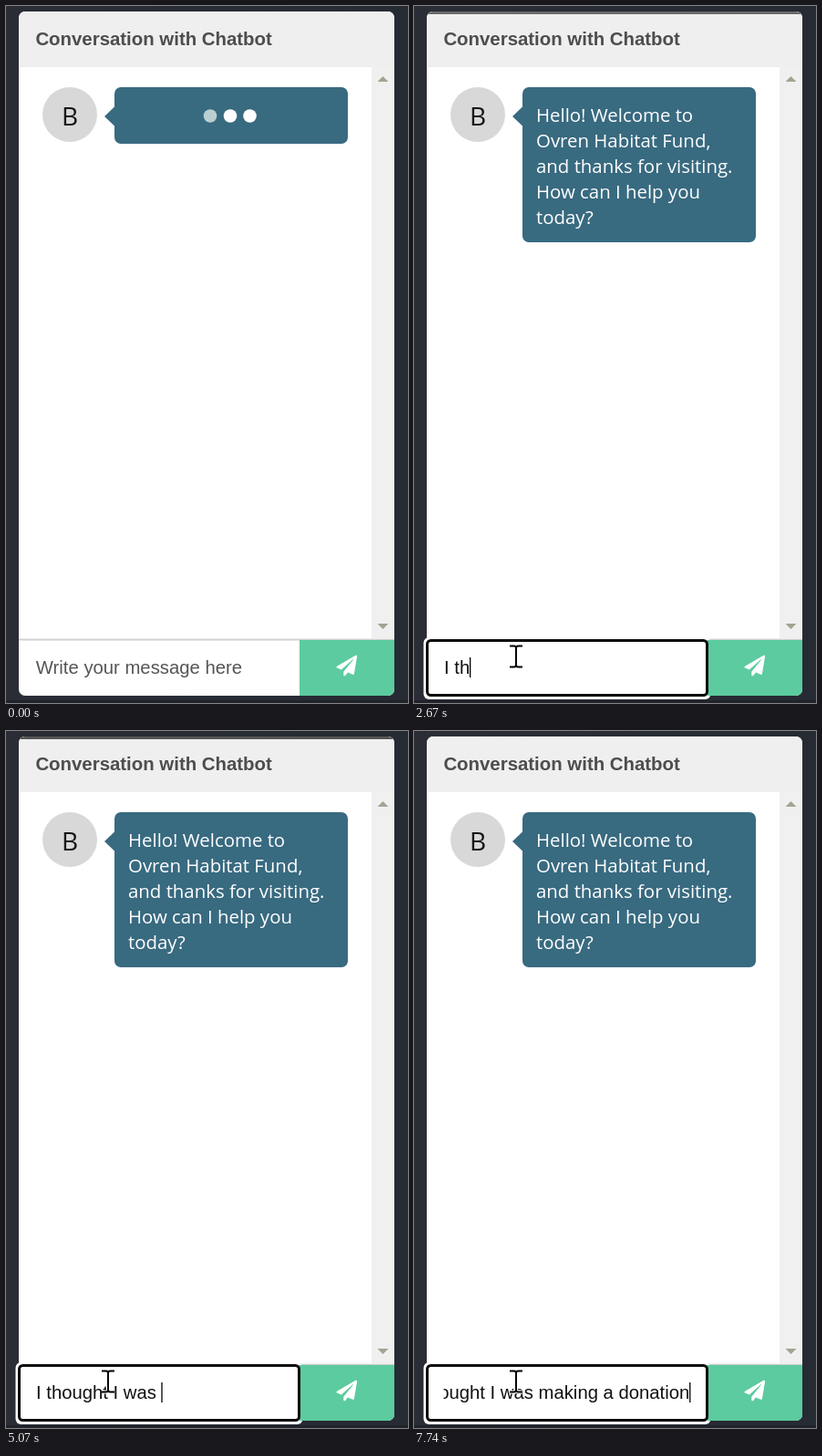
These frames come from a looping animation (441 px wide and 764 px high, 8000 ms). An HTML page:

```html
<!DOCTYPE html>
<html lang="en">
<head>
<meta charset="utf-8">
<title>Chatbot conversation</title>
<style>
html, body { margin: 0; width: 100%; height: 100%; overflow: hidden; background: #292c35; }
svg { display: block; width: 441px; height: 764px; }
text { white-space: pre; }
.ui { font: 20.3px "Liberation Sans", Arial, sans-serif; }
.head { font: bold 20.4px "Liberation Sans", Arial, sans-serif; fill: #4d4d4d; }
.talk { font: 20.4px "Open Sans", "Noto Sans", sans-serif; fill: #fff; }
.badge { font: 28px "Open Sans", "Noto Sans", sans-serif; fill: #151515; }
</style>
</head>
<body>
<svg viewBox="0 0 441 764" xmlns="http://www.w3.org/2000/svg">
  <defs>
    <linearGradient id="night">
      <stop offset="0" stop-color="#2b2d36"/>
      <stop offset="1" stop-color="#262b33"/>
    </linearGradient>
    <clipPath id="card"><rect x="14" y="6" width="412" height="750" rx="7"/></clipPath>
    <clipPath id="field"><rect x="32.5" y="700" width="271" height="50"/></clipPath>
  </defs>
  <rect width="441" height="764" fill="url(#night)"/>
  <rect y="761" width="441" height="3" fill="#202329"/>

  <g clip-path="url(#card)">
    <rect x="14" y="6" width="412" height="750" fill="#fff"/>
    <rect x="14" y="6" width="412" height="61" fill="#efefef"/>
    <rect id="bar" x="14" y="6" width="412" height="3"/>
    <rect x="401" y="67" width="25" height="627" fill="#f0f0f0"/>
    <path d="M407.5 83h12l-6-6zM407.5 677h12l-6 6z" fill="#a3a391"/>
    <rect x="14" y="693" width="412" height="1" fill="#ececec"/>
    <rect x="14" y="694" width="412" height="1.5" fill="#cfcfcf"/>
  </g>
  <text class="head" x="32.4" y="43">Conversation with Chatbot</text>

  <circle cx="70" cy="119" r="30" fill="#d8d8d8"/>
  <text class="badge" x="70" y="131" text-anchor="middle">B</text>
  <path d="M108 121l12-11.5v23z" fill="#386a80"/>
  <rect id="bubble" x="119" y="89" width="256" rx="7" fill="#386a80"/>
  <g id="dots" fill="#fff"></g>
  <g id="hello" class="talk"></g>

  <rect id="halo" x="10.5" y="692" width="315" height="68" rx="6" fill="#fff"/>
  <g clip-path="url(#card)">
    <rect x="322" y="695" width="104" height="61" fill="#5ccb9f"/>
  </g>
  <rect id="ring" x="14.5" y="695.5" width="307" height="60" rx="4" fill="#fff" stroke="#0c0c0c" stroke-width="3"/>
  <path transform="translate(362.5 711.7) scale(.0442)" fill="#fff" d="M476 3.2L12.5 270.6c-18.1 10.4-15.8 35.6 2.2 43.2L121 358.4l287.3-253.2c5.5-4.9 13.3 2.6 8.6 8.3L176 407v80.5c0 23.6 28.5 32.9 42.5 15.8L282 426l124.6 52.2c14.2 6 30.4-2.9 33-18.2l72-432C515 7.8 493.3-6.8 476 3.2z"/>

  <g clip-path="url(#field)">
    <text id="hint" class="ui" x="32.8" y="732" fill="#555">Write your message here</text>
    <text id="typed" class="ui" x="33" y="732" fill="#111"></text>
  </g>
  <rect id="caret" y="714" width="1.3" height="22" fill="#000"/>
  <g id="beam" fill="none">
    <path id="stem" d="M-7-11.5h4.5q2.5 0 2.5 2v19q0 2-2.5 2h-4.5M7-11.5h-4.5q-2.5 0-2.5 2v19q0 2 2.5 2h4.5" stroke="#fff" stroke-width="4"/>
    <use href="#stem" style="display:none"/>
    <path d="M-7-11.5h4.5q2.5 0 2.5 2v19q0 2-2.5 2h-4.5M7-11.5h-4.5q-2.5 0-2.5 2v19q0 2 2.5 2h4.5" stroke="#000" stroke-width="2"/>
  </g>
</svg>
<script>
const LOOP = 8000;
const MESSAGE = "I thought I was making a donation";
const LINES = ["Hello! Welcome to", "Ovren Habitat Fund,", "and thanks for visiting.", "How can I help you", "today?"];

// [start ms, characters typed]
const TYPING = [
  [0, 0], [1880, 1], [2410, 3], [2670, 4], [2940, 5], [3200, 7], [3480, 9],
  [3750, 10], [4010, 12], [4280, 13], [4540, 14], [4810, 15], [5070, 16],
  [5330, 17], [5600, 19], [5880, 22], [6140, 24], [6410, 25], [6680, 26],
  [6940, 28], [7210, 29], [7480, 31], [7740, 33]
];
// [start ms, colour of the strip along the top edge]
const STRIP = [[0, "none"], [1610, "#555"], [2410, "#6a6a6a"], [2940, "#555"], [5330, "none"]];

const $ = id => document.getElementById(id);
const NS = "http://www.w3.org/2000/svg";

function add(parent, tag, attrs, text = "") {
  const el = document.createElementNS(NS, tag);
  for (const key in attrs) el.setAttribute(key, attrs[key]);
  el.textContent = text;
  parent.appendChild(el);
  return el;
}

function show(id, on) {
  $(id).style.display = on ? "" : "none";
}

function pick(steps, t) {
  return steps.filter(step => step[0] <= t).pop()[1];
}

$("stem").nextElementSibling.remove();
const dots = [224, 246, 267.5].map(cx => add($("dots"), "circle", { cx, cy: 120.5, r: 7.3 }));
LINES.forEach((line, i) => add($("hello"), "text", { x: 134, y: 127 + 28 * i }, line));

function draw(t) {
  const greeted = t >= 550;
  $("bubble").setAttribute("height", greeted ? 170 : 62);
  show("dots", !greeted);
  show("hello", greeted);
  const dim = t < 290 ? 0 : 1;
  dots.forEach((dot, i) => dot.setAttribute("fill", i === dim ? "#b9cfcf" : "#fff"));

  const focused = t >= 1340;
  show("halo", focused);
  show("ring", focused);
  show("caret", focused);
  $("bar").setAttribute("fill", pick(STRIP, t));

  show("beam", t >= 810);
  $("beam").setAttribute("transform", `translate(${t < 1070 ? 103 : 112} 713)`);

  const count = pick(TYPING, t);
  const typed = $("typed");
  show("hint", count === 0);
  typed.textContent = MESSAGE.slice(0, count);
  const width = count ? typed.getComputedTextLength() : 0;
  const scroll = Math.max(0, width - 269.3);
  typed.setAttribute("x", 33 - scroll);
  $("caret").setAttribute("x", 32.8 + width - scroll);
}

const start = performance.now();
function tick() {
  draw((performance.now() - start) % LOOP);
  requestAnimationFrame(tick);
}
tick();
</script>
</body>
</html>
```
